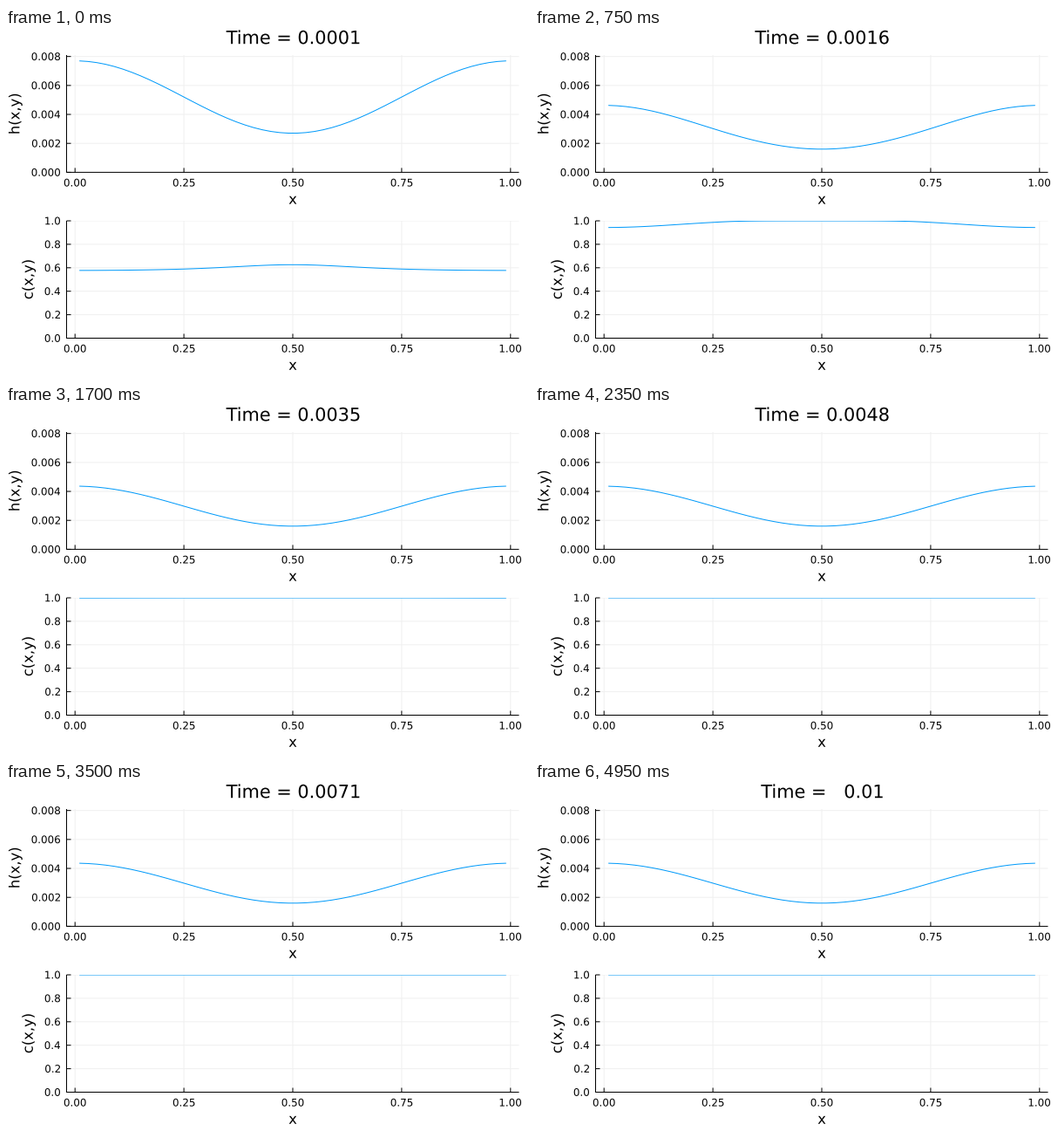
A matplotlib script for the animation above (5 s loop, 600x400 px).

```python
import matplotlib.pyplot as plt
import numpy as np
from matplotlib.animation import FuncAnimation
from matplotlib.patches import PathPatch, Rectangle
from matplotlib.path import Path
from matplotlib.textpath import TextPath
from matplotlib.transforms import Affine2D

W, H, DPI = 600, 400, 100
FRAMES, STEP_MS, SUBSTEPS = 100, 50, 25
RATE, LEAD = 0.00094, 0.85      # evaporation per frame, lead of concentration
LEFT, RIGHT = 69.5, 588.5
MID = (LEFT + RIGHT) / 2
X_MIN, X_MAX = -0.0194, 1.0194
BLUE, GRID = "#009afa", "#f0f0f0"
TICK, TICK_SIZE, LABEL_SIZE, TITLE_SIZE = 5, 11.9, 16.37, 20.83

plt.rcParams.update({
    "font.family": "DejaVu Sans",
    "path.snap": False,
    "lines.linewidth": 72 / DPI,
    "lines.solid_capstyle": "butt",
    "lines.solid_joinstyle": "miter",
})

fig = plt.figure(figsize=(W / DPI, H / DPI), dpi=DPI, facecolor="white")
stage = fig.add_axes([0, 0, 1, 1], xlim=(0, W), ylim=(H, 0))
stage.axis("off")
stage.set_autoscale_on(False)


def text_path(text, x, y, size, align=0.5, angle=0):
    """Outline of a text, its ink aligned at x (0 left, 1 right), baseline at y."""
    glyphs = TextPath((0, 0), text, size=size)
    ink = glyphs.get_extents()
    place = (Affine2D().translate(-ink.x0 - align * ink.width, 0)
             .rotate_deg(angle).scale(1, -1).translate(x, y))
    return Path(place.transform(glyphs.vertices), glyphs.codes)


def write(*args, **kwargs):
    return stage.add_patch(PathPatch(text_path(*args, **kwargs),
                                     facecolor="black", linewidth=0))


def stroke(xs, ys, color="black"):
    return stage.plot(xs, ys, color=color)[0]


def to_x(v):
    return LEFT + (v - X_MIN) / (X_MAX - X_MIN) * (RIGHT - LEFT)


class Panel:
    """One plot with axes, grid, labels and a curve clipped to its area."""

    def __init__(self, top, bottom, y_max, ticks, fmt, name, name_x):
        self.top, self.bottom, self.y_max = top, bottom, y_max
        area = Rectangle((LEFT, top), RIGHT - LEFT, bottom - top,
                         transform=stage.transData)
        x_ticks = [(to_x(v), f"{v:.2f}") for v in np.linspace(0, 1, 5)]
        y_ticks = [(self.to_y(v), fmt.format(v)) for v in ticks]

        for x, _ in x_ticks:
            stroke([x, x], [top, bottom], GRID)
        for y, _ in y_ticks:
            stroke([LEFT, RIGHT], [y, y], GRID).set_clip_path(area)
        self.curve = stroke([], [], BLUE)
        self.curve.set_clip_path(area)

        stroke([LEFT, LEFT, RIGHT], [top, bottom, bottom])
        for x, label in x_ticks:
            stroke([x, x], [bottom, bottom - TICK])
            write(label, x, bottom + 16.1, TICK_SIZE)
        for y, label in y_ticks:
            stroke([LEFT, LEFT + TICK], [y, y])
            write(label, 62, y + 4.3, TICK_SIZE, align=1)
        write("x", MID, bottom + 36.3, LABEL_SIZE)
        write(name, name_x, (top + bottom) / 2, LABEL_SIZE, angle=90)

    def to_y(self, v):
        return self.bottom - v / self.y_max * (self.bottom - self.top)

    def show(self, values):
        self.curve.set_data(to_x(grid_x), self.to_y(values))


def simulate(x):
    """Film height thins until the solute saturates at c = 1."""
    wave = np.cos(2 * np.pi * x)
    solute = 0.00298 + 0.00138 * wave
    h = 0.0052 + 0.0025 * wave
    rate = RATE * (1 + 0.15 * np.maximum(-wave, 0))
    dt = rate / SUBSTEPS
    for _ in range(FRAMES):
        c = solute / h
        yield h, c + LEAD * rate * c * (1 - c) ** 2 / h
        for _ in range(SUBSTEPS):
            half = h - 0.5 * dt * (1 - solute / h)
            h = h - dt * (1 - solute / half)


grid_x = np.linspace(0.01, 0.99, 50)
states = list(simulate(grid_x))
height = Panel(31, 165.4, 0.0081, np.arange(5) * 0.002, "{:.3f}",
               "h(x,y)", 15.4)
conc = Panel(221, 355.5, 1.0, np.arange(6) * 0.2, "{:.1f}", "c(x,y)", 30.7)
title_spot = (MID, 18.2, TITLE_SIZE)
title = write("Time", *title_spot)


def draw(k):
    h, c = states[k]
    title.set_path(text_path(f"Time = {(k + 1) / 10000:6.4g}", *title_spot))
    height.show(h)
    conc.show(c)
    return title, height.curve, conc.curve


anim = FuncAnimation(fig, draw, frames=FRAMES, interval=STEP_MS,
                     repeat=True, repeat_delay=0)
plt.show()
```
